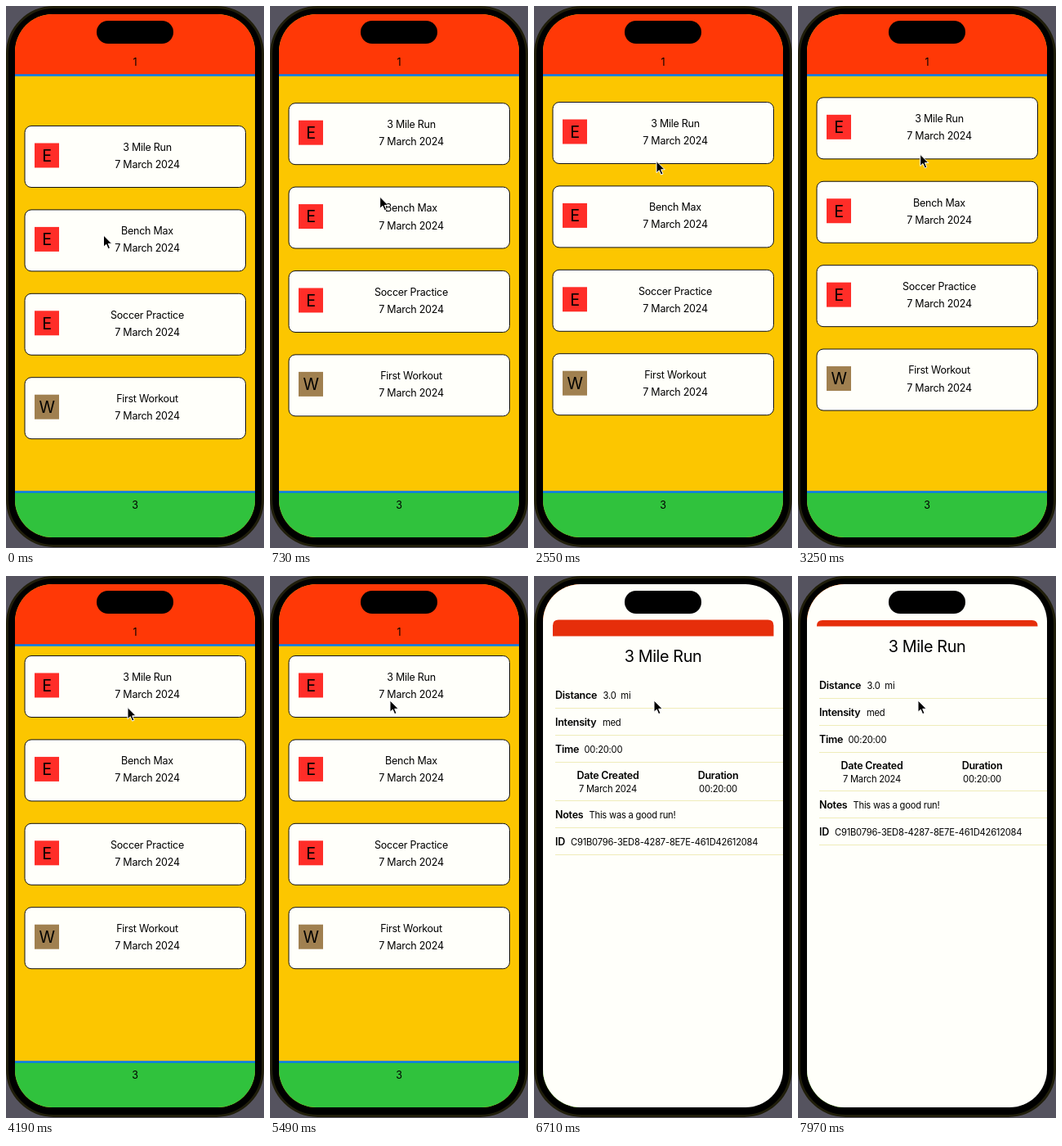
Write an HTML page that moves like this. It is 316x662 px and loops after 7.99 s.

```html
<!DOCTYPE html>
<html lang="en">
<head>
<meta charset="utf-8">
<title>Workout list</title>
<style>
  html, body { margin: 0; width: 100%; height: 100%; overflow: hidden; background: #55535f; }
  svg { display: block; width: 100vw; height: 100vh; }
  text { font-family: Inter, Roboto, sans-serif; font-size: 12.5px; letter-spacing: -.02em; fill: #000; }
  .mid { text-anchor: middle; }
  .big { font-size: 19.8px; }
  .label { font-weight: 600; }
  .value { font-size: 11.2px; }
</style>
</head>
<body>
<svg viewBox="0 0 316 662">
  <defs>
    <clipPath id="screen"><rect x="11" y="10" width="294" height="639" rx="46"/></clipPath>
    <clipPath id="listArea"><rect x="11" y="85" width="294" height="508"/></clipPath>
  </defs>
  <rect width="316" height="662" fill="#55535f"/>
  <rect x="1.5" y="1.5" width="313" height="658" rx="57" fill="#000" stroke="#201e0b" stroke-width="3"/>
  <g clip-path="url(#screen)">
    <g id="home">
      <rect x="11" y="10" width="294" height="639" fill="#fcc600"/>
      <g clip-path="url(#listArea)"><g id="cards"></g></g>
      <rect x="11" y="10" width="294" height="74" fill="#ff3806"/>
      <rect x="11" y="594" width="294" height="55" fill="#30c23d"/>
      <path d="M11 84.5H305M11 593.5H305" stroke="#087bee" stroke-width="2.4"/>
      <text class="mid" x="158" y="73">1</text>
      <text class="mid" x="158" y="614">3</text>
    </g>
    <rect id="dim" x="11" y="10" width="294" height="639" opacity="0"/>
    <g id="detail">
      <rect x="11" y="10" width="294" height="639" fill="#fffffa"/>
      <path id="bar" fill="#e62e0b"/>
      <g id="info"></g>
    </g>
  </g>
  <rect x="111" y="18" width="94" height="28" rx="14"/>
  <path id="pointer" d="M0 0V14.2L3.3 11.2L5.6 16.6L8 15.6L5.7 10.3H10.2Z" stroke="#fff" stroke-width="1"/>
</svg>
<script>
const LOOP = 7990;
const $ = id => document.getElementById(id);

const text = (x, y, cls, str) => `<text x="${x}" y="${y}" class="${cls}">${str}</text>`;

function card([name, letter, color], i) {
  return `<g transform="translate(0 ${i * 102.4})">
    <rect x="23" y="0" width="270.5" height="75" rx="8" fill="#fffffa" stroke="#111"/>
    <rect x="35" y="21" width="30" height="30" fill="${color}"/>
    ${text(50, 43.3, "mid big", letter)}
    ${text(173, 30.3, "mid", name)}
    ${text(173, 51.5, "mid", "7 March 2024")}</g>`;
}

$("cards").innerHTML = [
  ["3 Mile Run", "E", "#ff2d28"],
  ["Bench Max", "E", "#ff2d28"],
  ["Soccer Practice", "E", "#ff2d28"],
  ["First Workout", "W", "#a08050"]
].map(card).join("");

const row = (y, label, x, value) => text(26, y, "label", label) + text(x, y - .4, "value", value);
const column = (x, label, value) => text(x, 248.3, "mid label", label) + text(x, 263.8, "mid value", value);

$("info").innerHTML =
  text(158, 105.3, "mid big", "3 Mile Run") +
  row(149.9, "Distance", 84.5, "3.0&#160; mi") +
  row(182.9, "Intensity", 84, "med") +
  row(215.9, "Time", 61.5, "00:20:00") +
  column(90.5, "Date Created", "7 March 2024") +
  column(225.5, "Duration", "00:20:00") +
  row(296.3, "Notes", 67.5, "This was a good run!") +
  row(329.3, "ID", 45, "C91B0796-3ED8-4287-8E7E-461D42612084") +
  [161.5, 194.5, 227.5, 274.5, 307.5, 340.5]
    .map(y => `<path d="M26 ${y}H305" stroke="#efecba"/>`).join("");

const inOut = p => p * p * (3 - 2 * p);
const out = p => 1 - (1 - p) ** 3;

// Keys are [time, value]; the value eases from one key to the next.
function track(keys, t, ease = inOut) {
  const i = keys.findIndex(k => k[0] > t);
  if (i < 0) return keys[keys.length - 1][1];
  if (i === 0) return keys[0][1];
  const [t0, a] = keys[i - 1], [t1, b] = keys[i];
  return a + (b - a) * ease((t - t0) / (t1 - t0));
}

const listY = [[130, 146.5], [1400, 86], [1650, 86], [2450, 117.5], [2900, 117.5], [3900, 97.5]];
const pointerX = [[130, 119.5], [1400, 152.5], [1650, 152.5], [2450, 150], [2900, 150], [3900, 149], [4890, 149], [5400, 147]];
const pointerY = [[130, 280], [1400, 178], [1650, 178], [2450, 189.5], [2900, 189.5], [3900, 160.5], [4890, 160.5], [5400, 152]];
const push = [[5600, 0], [6100, 1]];
const scroll = [[6900, 0], [7900, 12]];

function render(t) {
  $("cards").setAttribute("transform", `translate(0 ${track(listY, t)})`);
  $("pointer").setAttribute("transform", `translate(${track(pointerX, t)} ${track(pointerY, t)})`);

  const p = track(push, t, out);
  $("home").setAttribute("transform", `translate(${-88 * p} 0)`);
  $("dim").setAttribute("opacity", .1 * p);
  $("detail").setAttribute("transform", `translate(${294 * (1 - p)} 0)`);
  $("detail").setAttribute("visibility", p > 0 ? "visible" : "hidden");

  const s = track(scroll, t);
  const top = 53.5 + s / 24, bottom = 73.5 - s, r = Math.min(7, bottom - top);
  $("bar").setAttribute("d",
    `M23 ${bottom}V${top + r}q0 ${-r} ${r} ${-r}H${293.5 - r}q${r} 0 ${r} ${r}V${bottom}Z`);
  $("info").setAttribute("transform", `translate(0 ${-s})`);
}

const start = performance.now();
function tick() {
  render((performance.now() - start) % LOOP);
  requestAnimationFrame(tick);
}
tick();
</script>
</body>
</html>
```
